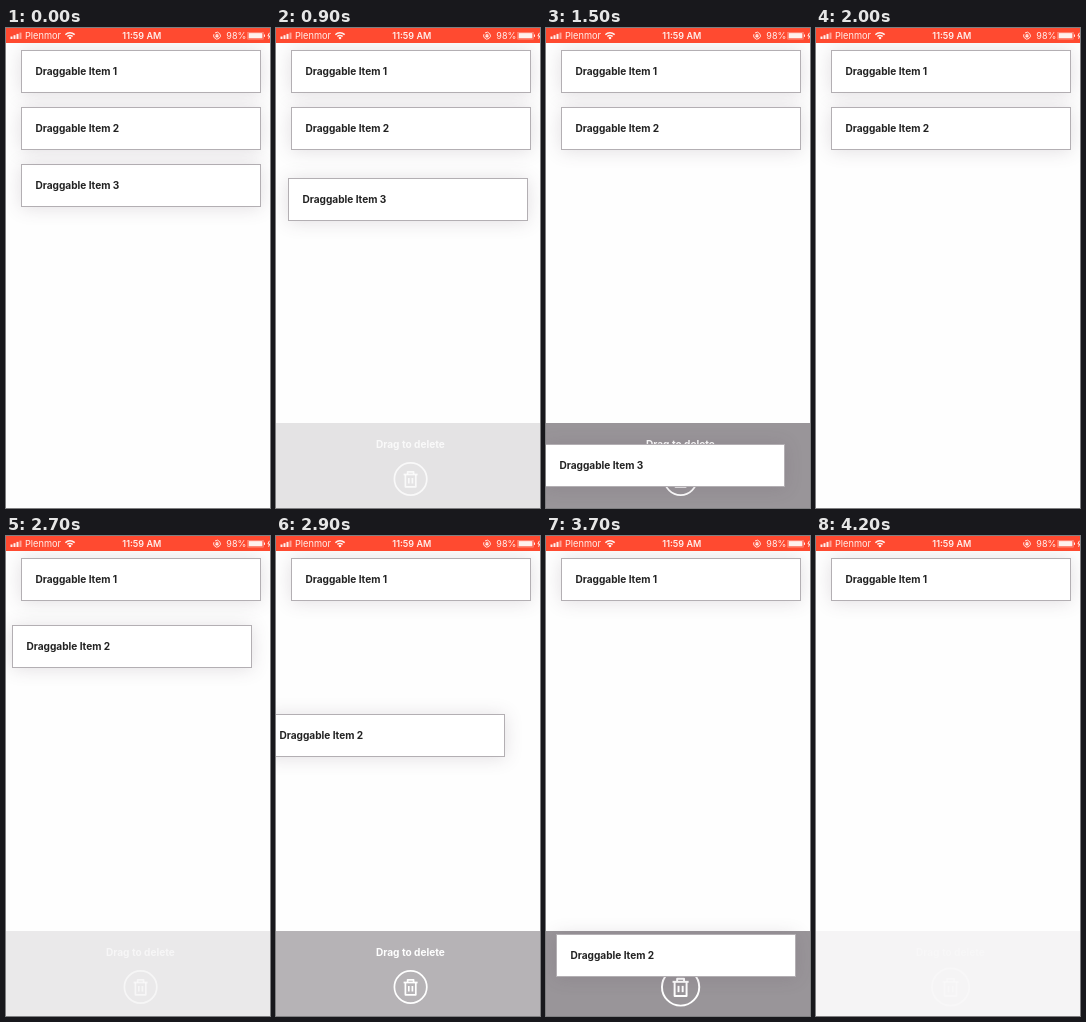
Write an HTML page with a canvas that moves like this. It is 264 px wide and 480 px high and loops after 4300 ms.

```html
<!DOCTYPE html>
<html lang="en">
<head>
<meta charset="utf-8">
<title>Drag to delete</title>
<style>
  html, body { margin: 0; width: 100%; height: 100%; overflow: hidden; background: #fff; }
  canvas { display: block; width: 264px; height: 480px; }
</style>
</head>
<body>
<canvas id="stage"></canvas>
<script>
const W = 264, H = 480, LOOP = 4300, STEP = 100;
const PANEL_TOP = 395;
const FONT = 'Inter, "Liberation Sans", sans-serif';
const canvas = document.getElementById('stage');
const ctx = canvas.getContext('2d');
const dpr = window.devicePixelRatio || 1;
canvas.width = W * dpr;
canvas.height = H * dpr;

// fall: distance down; sway: sideways reach; swing: angle the sway sweeps through
const drags = [
  { item: 3, start: 795, length: 805, drop: 1660, fall: 292.5, sway: 16, swing: Math.PI / 2 },
  { item: 2, start: 2620, length: 756, drop: 3900, fall: 319, sway: 29.2, swing: 2.97 }
];

const ramp = (t, start, length) => Math.min(1, Math.max(0, (t - start) / length));
const ease = u => u * u * (3 - 2 * u);

function offset(d, t) {
  const u = ramp(t, d.start, d.length);
  return [-d.sway * Math.sin(u * d.swing), d.fall * ease(u)];
}

function text(str, x, y, size, weight, color, align = 'left') {
  ctx.font = `${weight} ${size}px ${FONT}`;
  ctx.textAlign = align;
  ctx.fillStyle = color;
  ctx.fillText(str, x, y);
}

function line(...points) {
  ctx.beginPath();
  points.forEach(([x, y], i) => i ? ctx.lineTo(x, y) : ctx.moveTo(x, y));
  ctx.stroke();
}

function arc(x, y, r, from = 0, to = Math.PI * 2) {
  ctx.beginPath();
  ctx.arc(x, y, r, from, to);
  ctx.stroke();
}

function card(n, dx = 0, dy = 0) {
  const x = Math.round(15 + dx), y = Math.round(22 + (n - 1) * 57 + dy);
  ctx.save();
  ctx.fillStyle = '#fff';
  ctx.shadowColor = 'rgba(85,65,85,.17)';
  ctx.shadowBlur = 18 * dpr;
  ctx.shadowOffsetY = dpr;
  ctx.fillRect(x, y, 240, 43);
  ctx.restore();
  ctx.lineWidth = 1;
  ctx.strokeStyle = '#b3afb3';
  ctx.strokeRect(x + 0.5, y + 0.5, 239, 42);
  text('Draggable Item ' + n, x + 14.4, y + 25, 10.1, 700, '#222');
}

function trash(scale) {
  ctx.save();
  ctx.translate(134.6, 451);
  ctx.scale(scale, scale);
  ctx.strokeStyle = '#fff';
  ctx.lineWidth = 1.7;
  ctx.lineJoin = 'round';
  arc(0, 0, 16.2);
  line([-7, -4.5], [7, -4.5]);
  line([-3, -4.5], [-3, -7.2], [3, -7.2], [3, -4.5]);
  line([-5.2, -4.5], [-5.2, 7.8], [5.2, 7.8], [5.2, -4.5]);
  for (const x of [-1.8, 1.8]) line([x, -1], [x, 4.5]);
  ctx.restore();
}

function panel(alpha, scale) {
  if (alpha <= 0) return;
  ctx.save();
  ctx.globalAlpha = alpha;
  ctx.fillStyle = '#999599';
  ctx.fillRect(0, PANEL_TOP, W, H - PANEL_TOP);
  ctx.globalAlpha = Math.min(1, alpha * 3);
  text('Drag to delete', 134.4, 420, 10.1, 700, '#fff', 'center');
  trash(scale);
  ctx.restore();
}

function statusBar() {
  const white = '#fff1ee', faint = '#ffa294';
  ctx.fillStyle = '#ff4a30';
  ctx.fillRect(0, 0, W, 15);

  for (let i = 0; i < 4; i++) {
    const h = 2.5 + i * 1.3;
    ctx.fillStyle = i < 3 ? white : faint;
    ctx.fillRect(4.5 + i * 3, 11 - h, 2, h);
  }
  text('Plenmor', 19, 11, 9.2, 400, white);

  ctx.strokeStyle = white;
  ctx.lineWidth = 1.5;
  for (const r of [3.6, 6.3]) arc(64, 11, r, -Math.PI * 0.76, -Math.PI * 0.24);
  ctx.beginPath();
  ctx.arc(64, 10, 1.3, 0, Math.PI * 2);
  ctx.fillStyle = white;
  ctx.fill();

  text('11:59 AM', 135.8, 11, 9, 600, white, 'center');

  // Rotation lock
  ctx.lineWidth = 0.9;
  arc(211, 7.7, 3.4, -2.2, 3.6);
  ctx.fillRect(209.5, 7.2, 3, 2.2);
  arc(211, 7.2, 1, Math.PI, 0);

  text('98%', 220.3, 11, 9, 400, white);

  // Battery and charging bolt
  ctx.strokeStyle = faint;
  ctx.lineWidth = 0.6;
  ctx.strokeRect(241.8, 4.3, 15.4, 6.8);
  ctx.fillRect(242.6, 5.1, 13.8, 5.2);
  ctx.fillRect(258, 6.5, 1, 2.4);
  ctx.strokeStyle = white;
  ctx.lineWidth = 1;
  line([263.4, 4.8], [261.9, 8], [263.6, 8], [262.6, 10.8]);
}

function draw(t) {
  ctx.setTransform(dpr, 0, 0, dpr, 0, 0);
  ctx.fillStyle = '#fefefe';
  ctx.fillRect(0, 0, W, H);

  card(1);
  for (const d of drags) if (t <= d.start) card(d.item);

  for (const d of drags) {
    const alpha = ramp(t, d.start, 400) - ramp(t, d.drop, 330);
    const active = ramp(t, d.start + d.length * 0.9, 100);
    panel(alpha, 1 + 0.15 * active);
  }
  for (const d of drags) {
    if (t > d.start && t < d.drop) card(d.item, ...offset(d, t));
  }
  statusBar();
}

const begin = performance.now();
function tick() {
  const t = (performance.now() - begin) % LOOP;
  draw(Math.floor(t / STEP) * STEP);
  requestAnimationFrame(tick);
}
tick();
</script>
</body>
</html>
```
